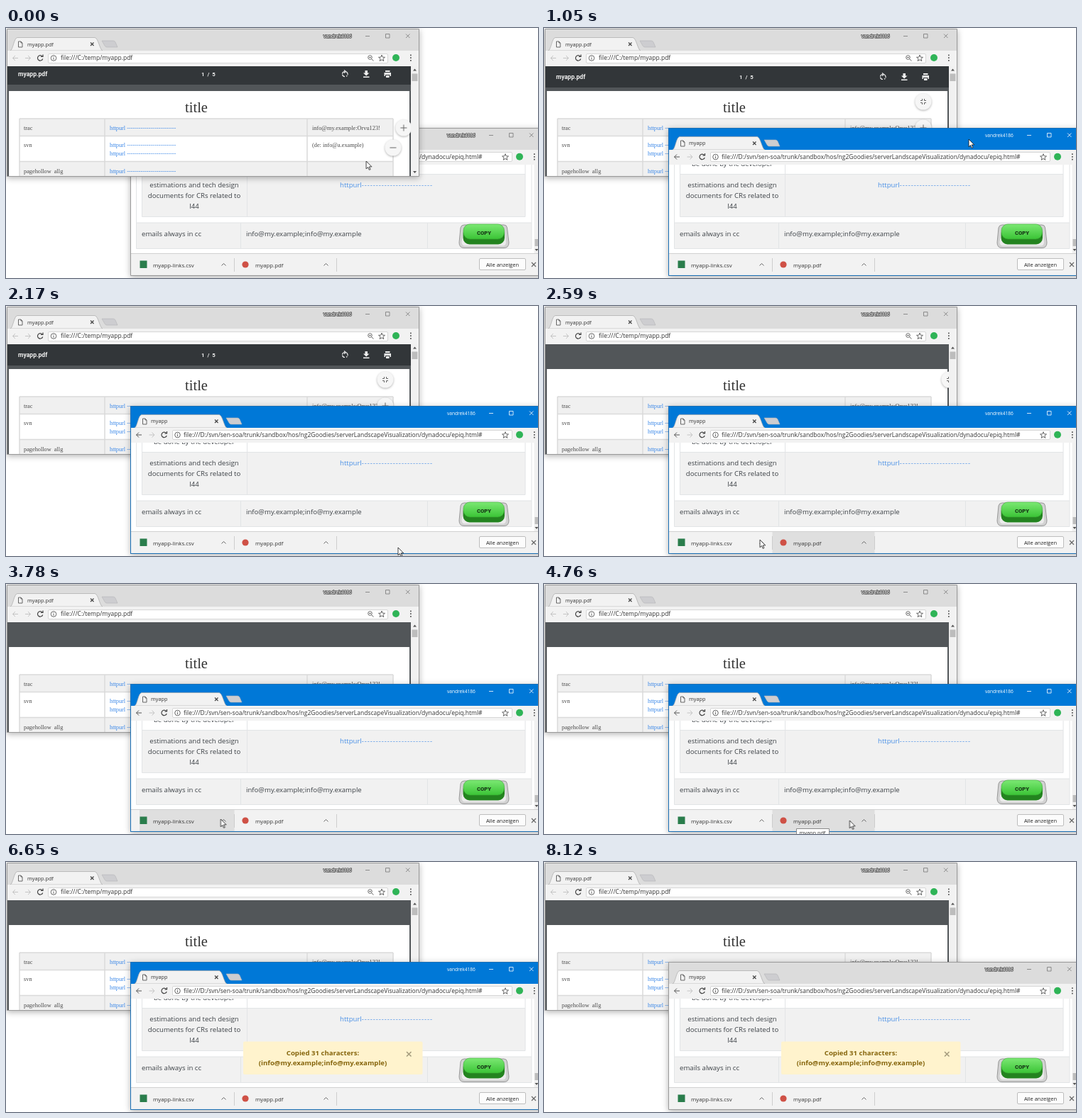
Animation of 749x353 px, one loop 8.26 s. Source, as an HTML page:

```html
<!DOCTYPE html>
<html lang="en">
<head>
<meta charset="utf-8">
<title>Two browser windows</title>
<style>
html, body { margin: 0; width: 100%; height: 100%; overflow: hidden; background: #fff; }
#stage { position: relative; width: 749px; height: 353px; overflow: hidden; }
#stage > svg { position: absolute; left: 0; top: 0; }
text { font-family: "Open Sans", "Noto Sans", sans-serif; fill: #3c4146; }
.ui { font-size: 7.3px; fill: #333; }
.url { font-size: 8.5px; fill: #333; }
.shelf { font-size: 7.8px; fill: #333; }
.body { font-size: 9.6px; }
.mid { text-anchor: middle; }
.link { fill: #4a90e6; }
.dash { letter-spacing: .92px; }
.doc text { font: 8.3px "Liberation Serif", serif; fill: #4a4a4a; }
.doc .link { fill: #3a87e8; }
.doc .head { font-size: 20.5px; fill: #333; }
.user { font-size: 6.6px; fill: #fff; stroke: #555; stroke-width: 1.5px; paint-order: stroke; }
.bar text { font: 700 8.6px Roboto, sans-serif; fill: #f1f1f1; }
.copy { font: 900 7.6px Roboto, sans-serif; fill: #173a17; }
.frame { filter: drop-shadow(0 2px 4px rgba(0,0,0,.3)); }
.line { fill: none; stroke: #666; stroke-width: 1; }
.soft { stroke: #c4c4c4; }
.fab { fill: #f6f6f6; filter: drop-shadow(0 1px 1.5px rgba(0,0,0,.3)); }
.warn text { fill: #85650c; font-weight: 700; }

.app, .blue, .grey, .outer, .row, .item1, .item2, .tip1, .tip2, .up, .down,
.warn, .arrow, .hand, .cursor, .bar, .fit, .plus, .minus {
  animation: 8.26s linear infinite;
}
.app { animation-name: raise; animation-timing-function: step-end; }
.blue { animation-name: active; animation-timing-function: step-end; }
.grey { animation-name: inactive; animation-timing-function: step-end; }
.outer { animation-name: outer; animation-timing-function: step-end; }
.row { animation-name: row; animation-timing-function: step-end; }
.up { animation-name: up; animation-timing-function: step-end; }
.down { animation-name: down; animation-timing-function: step-end; }
.arrow { animation-name: arrow; animation-timing-function: step-end; }
.hand { animation-name: hand; animation-timing-function: step-end; }
.item1 { animation-name: item1; }
.item2 { animation-name: item2; }
.tip1 { animation-name: tip1; }
.tip2 { animation-name: tip2; }
.warn { animation-name: warn; }
.cursor { animation-name: cursor; }
.bar { animation-name: bar; }
.fit { animation-name: fit; }
.plus { animation-name: plus; }
.minus { animation-name: minus; }

@keyframes raise { 0% { z-index: 0 } 12.71%, 100% { z-index: 2 } }
@keyframes active { 0%, 98.3%, 100% { opacity: 0 } 12.71% { opacity: 1 } }
@keyframes inactive { 0%, 98.3%, 100% { opacity: 1 } 12.71% { opacity: 0 } }
@keyframes outer { 0%, 22.93%, 100% { opacity: 0 } 18.8% { opacity: 1 } }
@keyframes row { 0%, 24.75%, 75.2%, 100% { opacity: 0 } 22.93%, 61.26% { opacity: 1 } }
@keyframes up { 0%, 68.64%, 100% { opacity: 1 } 66.95% { opacity: 0 } }
@keyframes down { 0%, 68.64%, 100% { opacity: 0 } 66.95% { opacity: 1 } }
@keyframes arrow { 0%, 75.2%, 100% { opacity: 1 } 63.56% { opacity: 0 } }
@keyframes hand { 0%, 75.2%, 100% { opacity: 0 } 63.56% { opacity: 1 } }
@keyframes item1 { 0%, 32%, 47.4%, 100% { opacity: 0 } 33.9%, 45.8% { opacity: 1 } }
@keyframes item2 { 0%, 28%, 33.9%, 46.6%, 61.9%, 100% { opacity: 0 } 28.8%, 31.4%, 48.3%, 60.2% { opacity: 1 } }
@keyframes tip1 { 0%, 39.83%, 45.76%, 100% { opacity: 0 } 42.37%, 45.75% { opacity: 1 } }
@keyframes tip2 { 0%, 50%, 60.5%, 100% { opacity: 0 } 51.69%, 60.49% { opacity: 1 } }
@keyframes warn { 0%, 66.1%, 100% { opacity: 0 } 67.8%, 99.99% { opacity: 1 } }
@keyframes bar {
  0% { transform: translateY(-4px) } 1.7%, 27.2% { transform: none }
  29.7%, 100% { transform: translateY(-30px) }
}
@keyframes minus {
  0% { transform: translateX(11px) } 1.7%, 27.2% { transform: none }
  29.7%, 100% { transform: translateX(50px) }
}
@keyframes plus {
  0% { transform: translateX(26px) } 2.5%, 28% { transform: none }
  30.5%, 100% { transform: translateX(50px) }
}
@keyframes fit {
  0% { transform: translateX(48px) } 3.4%, 29% { transform: none }
  32.2%, 100% { transform: translateX(50px) }
}
@keyframes cursor {
  0% { transform: translate(507px, 188px) }
  7.63%, 10.16% { transform: translate(593px, 157px) }
  10.17%, 16.95% { transform: translate(598px, 157px) }
  26.27% { transform: translate(552px, 341px) }
  27.12% { transform: translate(546px, 341px) }
  31.36% { transform: translate(304px, 330px) }
  37.29%, 44.92% { transform: translate(290px, 332px) }
  49.15%, 50.84% { transform: translate(351px, 332px) }
  50.85%, 54.24% { transform: translate(354px, 332px) }
  57.63% { transform: translate(430px, 334px) }
  64.41%, 65.24% { transform: translate(669px, 291px) }
  65.25%, 72.88% { transform: translate(671px, 291px) }
  80.51%, 100% { transform: translate(716px, 356px) }
}
</style>
</head>
<body>
<div id="stage">

<svg width="749" height="353" style="z-index:1">
  <defs>
    <clipPath id="view"><path d="M2 54H570V209H2z"/></clipPath>
    <clipPath id="page"><path d="M176 193H749V318H176z"/></clipPath>
    <linearGradient id="green" x2="0" y2="1">
      <stop stop-color="#7be873"/><stop offset="1" stop-color="#3bc436"/>
    </linearGradient>
    <g id="sheet"><path class="line" stroke-width=".8" d="M-2.5-4H1L3-2V4H-2.5zM1-4V-2H3"/></g>
    <g id="info"><circle class="line" r="3.800"/><path class="line" d="M0-.5V2.200M0-2.200V-1.200"/></g>
    <g id="chev"><path class="line" d="M-3 1.5L0-1.5 3 1.5"/></g>
    <g id="nav">
      <path d="M6 32C10 31 11 14 16 13.500H125C130 14 132 31 136 32z" fill="#f2f2f2" stroke="#aaa" stroke-width=".7"/>
      <path d="M135 18H151Q153 18 154 20L157 27H142Q140 27 139 25z" fill="#cdcdd0" stroke="#b4b4b8" stroke-width=".6"/>
      <use href="#sheet" x="20" y="23"/>
      <path class="line" style="stroke:#444;stroke-width:1.200" d="M119 20.500L123.500 25M123.500 20.500L119 25"/>
    </g>
    <path id="back" fill="none" stroke="currentColor" d="M17 42.500H9.500M13 39L9.500 42.500 13 46"/>
    <g id="tools">
      <path class="line soft" d="M27 42.500H34.500M31 39L34.500 42.500 31 46"/>
      <path class="line" style="stroke:#444;stroke-width:1.200" d="M51 40A3.700 3.700 0 1 0 51.700 43.500M52 37.500V40.500H49"/>
      <use href="#info" x="67" y="42.500"/>
    </g>
    <g id="marks">
      <path class="line" stroke-width=".8" d="M529 38L530.200 41.100 533.500 41.300 530.900 43.400 531.800 46.600 529 44.800 526.200 46.600 527.100 43.400 524.500 41.300 527.800 41.100z"/>
      <circle cx="549" cy="42" r="5" fill="#2fb457"/>
      <path d="M569 37.500h1.700v1.700h-1.700zM569 41.300h1.700v1.700h-1.700zM569 45.100h1.700v1.700h-1.700z" fill="#555"/>
    </g>
    <path id="ctl" fill="none" stroke="currentColor" stroke-width=".8" d="M506 11.500H512M534.500 8.500H540V14H534.500zM563 8.500L568.500 14M568.500 8.500L563 14"/>
  </defs>

  <path class="frame" d="M1.500 1.500H581.500V209.500H1.500z" fill="#dcdcdc" stroke="#9a9a9a"/>
  <use href="#nav"/>
  <text class="ui" x="30" y="25.500">myapp.pdf</text>
  <text class="user" x="447" y="14">vandrek4186</text>
  <use href="#ctl" color="#777"/>
  <path d="M2 32H581V54H2z" fill="#f2f2f2"/>
  <rect x="59.500" y="36.500" width="478" height="13" rx="1.500" fill="#fff" stroke="#d6d6d6"/>
  <use href="#back" color="#c4c4c4"/>
  <use href="#tools"/>
  <text class="url" x="77" y="45.300">file:///C:/temp/myapp.pdf</text>
  <g class="line"><circle cx="512.500" cy="41.500" r="2.800"/><path d="M514.500 43.500L517.500 46.500M511 41.500H514"/></g>
  <use href="#marks"/>

  <g clip-path="url(#view)">
    <path d="M2 54H570V209H2z" fill="#525659"/>
    <path d="M4 89H568V209H4z" fill="#fff"/>
    <g class="doc">
      <path d="M19 128H545V152.500H19zM19 188.500H545V209H19z" fill="#f0f0f0"/>
      <path d="M19 128H545M19 152.500H545M19 188.500H545M19 128V209M139 128V209M424 128V209M545 128V209" fill="none" stroke="#dadada" stroke-width="1.500"/>
      <text class="head mid" x="268" y="119">title</text>
      <text x="25" y="144">trac</text>
      <text x="25" y="168">svn</text>
      <text x="25" y="204.500">pagehollow&#160; allg</text>
      <text class="link" x="146" y="144">httpurl -------------------------</text>
      <text class="link" x="146" y="168">httpurl -------------------------</text>
      <text class="link" x="146" y="180">httpurl -------------------------</text>
      <text class="link" x="146" y="204.500">httpurl -------------------------</text>
      <text x="431" y="144">info@my.example:Orvu123!</text>
      <text x="431" y="168">(de: info@a.example)</text>
    </g>
    <g class="bar">
      <path d="M2 50H570V84H2z" fill="#323639"/>
      <text x="17" y="71.500">myapp.pdf</text>
      <text x="275" y="71.500" style="font-size:7.800px;word-spacing:2px">1 / 5</text>
      <g fill="none" stroke="#f1f1f1" stroke-width="1.200">
        <path d="M477 65.500A3.500 3.500 0 0 0 477 72.500M479 65.800A3.500 3.500 0 0 1 479 72.200" stroke-dasharray="5 1"/>
        <path d="M476 63.500L478.500 65.500 476 67.500"/>
      </g>
      <path d="M505.500 64H509V67.500H511.500L507.200 71.500 503 67.500H505.500zM503 72.500H511.500V74H503zM534 64H540.500V66H534zM532.500 67H542V72H540.500V70H534V72H532.500zM535 71H539.500V74H535z" fill="#f1f1f1"/>
    </g>
    <g class="fit">
      <circle class="fab" cx="534" cy="104" r="11.500"/>
      <path class="line" d="M530 102.500H532.500V100M535.500 100V102.500H538M538 105.500H535.500V108M532.500 108V105.500H530"/>
    </g>
    <g class="plus">
      <circle class="fab" cx="534" cy="141" r="11.500"/>
      <path class="line" d="M529.500 141H538.500M534 136.500V145.500"/>
    </g>
    <g class="minus">
      <circle class="fab" cx="534" cy="169" r="11.500"/>
      <path class="line" d="M529.500 169H538.500"/>
    </g>
  </g>
  <path d="M570 54H581V209H570z" fill="#f1f1f1"/>
  <path d="M571.500 64.500H579.500V75H571.500z" fill="#bdbdbd"/>
  <path d="M573 60.500L575.500 57.500 578 60.500zM573 202L575.500 205 578 202z" fill="#555"/>
</svg>

<svg class="app" width="749" height="353">
  <path class="frame" d="M175.500 141.500H756V349.500H175.500z" fill="#dcdcdc" stroke="#9a9a9a"/>
  <path class="blue" d="M175.500 141.500H756V349.500H175.500z" fill="#0078d7" stroke="#1a6fb5"/>
  <use href="#nav" x="175" y="140"/>
  <text class="ui" x="204" y="165">myapp</text>
  <g class="grey">
    <text class="user" x="621" y="154">vandrek4186</text>
    <use href="#ctl" x="174" y="140" color="#777"/>
  </g>
  <g class="blue">
    <text class="user" style="stroke:none" x="621" y="154">vandrek4186</text>
    <use href="#ctl" x="174" y="140" color="#fff"/>
  </g>
  <path d="M176 172H749V194H176z" fill="#f2f2f2"/>
  <rect x="234.500" y="175.500" width="478" height="13" rx="1.500" fill="#fff" stroke="#d6d6d6"/>
  <use href="#back" x="174" y="139.500" color="#555"/>
  <use href="#tools" x="174.500" y="139.500"/>
  <text class="url" x="250" y="185">file:///D:/svn/sen-soa/trunk/sandbox/hos/ng2Goodies/serverLandscapeVisualization/dynadocu/epiq.html#</text>
  <use href="#marks" x="174" y="139.700"/>

  <g clip-path="url(#page)">
    <path d="M176 193H749V318H176z" fill="#fff"/>
    <path d="M191.500 206.500H731V266.500H191.500zM183.500 275H740V311.500H183.500z" fill="#f1f1f1"/>
    <path class="outer" d="M183.500 193H740V275H183.500z" opacity="0" fill="rgba(0,0,0,.045)"/>
    <path class="row" d="M183.500 275H740V311.500H183.500z" opacity="0" fill="rgba(0,0,0,.05)"/>
    <path d="M191.500 193V266.500H731V193M191.500 206.500H731M339.500 193V266.500M183.500 193V311.500H740V193M183.500 275H740M330.500 275V311.500M593.500 275V311.500" fill="none" stroke="#e2e4e6"/>
    <g class="body">
      <g class="mid">
        <text x="265" y="194.700">be done by the developer</text>
        <text x="265" y="225">estimations and tech design</text>
        <text x="265" y="240">documents for CRs related to</text>
        <text x="265" y="255">I44</text>
      </g>
      <text class="link" x="470" y="225">httpurl<tspan class="dash">-------------------------</tspan></text>
      <text x="191" y="293.500">emails always in cc</text>
      <text x="338" y="293.500">info@my.example;info@my.example</text>
    </g>

    <path d="M645 278H701Q705 278 705.500 282L708 303Q708 310.500 701 310.500H645Q638 310.500 638 303L640 282Q641 278 645 278z" fill="#d2d2d2" stroke="#989898"/>
    <path d="M645 283H701L704 302Q704 307.500 699 307.500H647Q641.500 307.500 641.500 302z" fill="#ececec"/>
    <g class="up">
      <rect x="643.500" y="282" width="58.500" height="23.500" rx="9" fill="#23831f"/>
      <rect x="644" y="277" width="57.500" height="21" rx="9" fill="url(#green)" stroke="#36a831" stroke-width=".6"/>
      <text class="copy mid" x="673" y="291.500">COPY</text>
    </g>
    <g class="down" opacity="0">
      <rect x="643.500" y="282.500" width="58" height="22" rx="9" fill="url(#green)" stroke="#2a9126"/>
      <text class="copy mid" x="672" y="297">COPY</text>
    </g>

    <g class="warn body" opacity="0">
      <rect x="334" y="253.500" width="252.500" height="46.500" rx="2" fill="#fff3cd"/>
      <text class="mid" x="446" y="273">Copied 31 characters:</text>
      <text class="mid" x="446" y="286.500">(info@my.example;info@my.example)</text>
      <path d="M564 268L570.500 274.500M570.500 268L564 274.500" stroke="#a39a7c" stroke-width="1.500"/>
    </g>
    <path d="M743.500 193H749V318H743.500z" fill="#f1f1f1"/>
    <path d="M744.500 298H749V308H744.500z" fill="#bdbdbd"/>
    <path d="M744.500 312L747 315 749.500 312z" fill="#555"/>
  </g>

  <path d="M176 318H749V349H176z" fill="#f2f2f2"/>
  <path d="M176 318.500H749" stroke="#d0d0d0"/>
  <path class="item1" d="M188 319H321.500V349H188z" opacity="0" fill="rgba(0,0,0,.08)"/>
  <path class="item2" d="M321.500 319H465.500V349H321.500z" opacity="0" fill="rgba(0,0,0,.08)"/>
  <path d="M321.500 325V344M465.500 325V344" stroke="#cdcdcd"/>
  <rect x="188.500" y="328.500" width="10" height="10.500" fill="#2a7d4c"/>
  <text class="shelf" x="207" y="338">myapp-links.csv</text>
  <use href="#chev" x="306.500" y="334"/>
  <circle cx="337" cy="334" r="4.600" fill="#cf5146"/>
  <text class="shelf" x="351" y="338">myapp.pdf</text>
  <use href="#chev" x="450.500" y="334"/>
  <rect x="666.500" y="325.500" width="65" height="16" rx="1.500" fill="#fcfcfc" stroke="#bdbdbd"/>
  <text class="mid" style="font-size:7.500px;fill:#222" x="699" y="336.500">Alle anzeigen</text>
  <path class="line" style="stroke-width:1.200" d="M740 331L746 337M746 331L740 337"/>
</svg>

<svg width="749" height="353" style="z-index:3">
  <g class="tip1" opacity="0">
    <path d="M290.500 345.500H355.500V359H290.500z" fill="#fff" stroke="#8a8a8a"/>
    <text class="ui" x="294" y="354">myapp-links.csv</text>
  </g>
  <g class="tip2" opacity="0">
    <path d="M355.500 345.500H401.500V359H355.500z" fill="#fff" stroke="#8a8a8a"/>
    <text class="ui" x="359.500" y="354">myapp.pdf</text>
  </g>
  <g class="cursor" fill="#fff" stroke="#111" stroke-width=".8" stroke-linejoin="round">
    <path class="arrow" d="M0 0V10.800L2.500 8.500 4.200 12.400 5.900 11.700 4.200 7.900H7.700z"/>
    <path class="hand" opacity="0" d="M-.9 8V.8Q0-.7 1 .8V5Q2.200 4.200 2.800 5.300 4 4.700 4.500 5.800 6 5.400 6.200 7V10L5 14H-.3L-3.600 9.300Q-3.800 7.300-2 7.700z"/>
  </g>
</svg>

</div>
</body>
</html>
```
